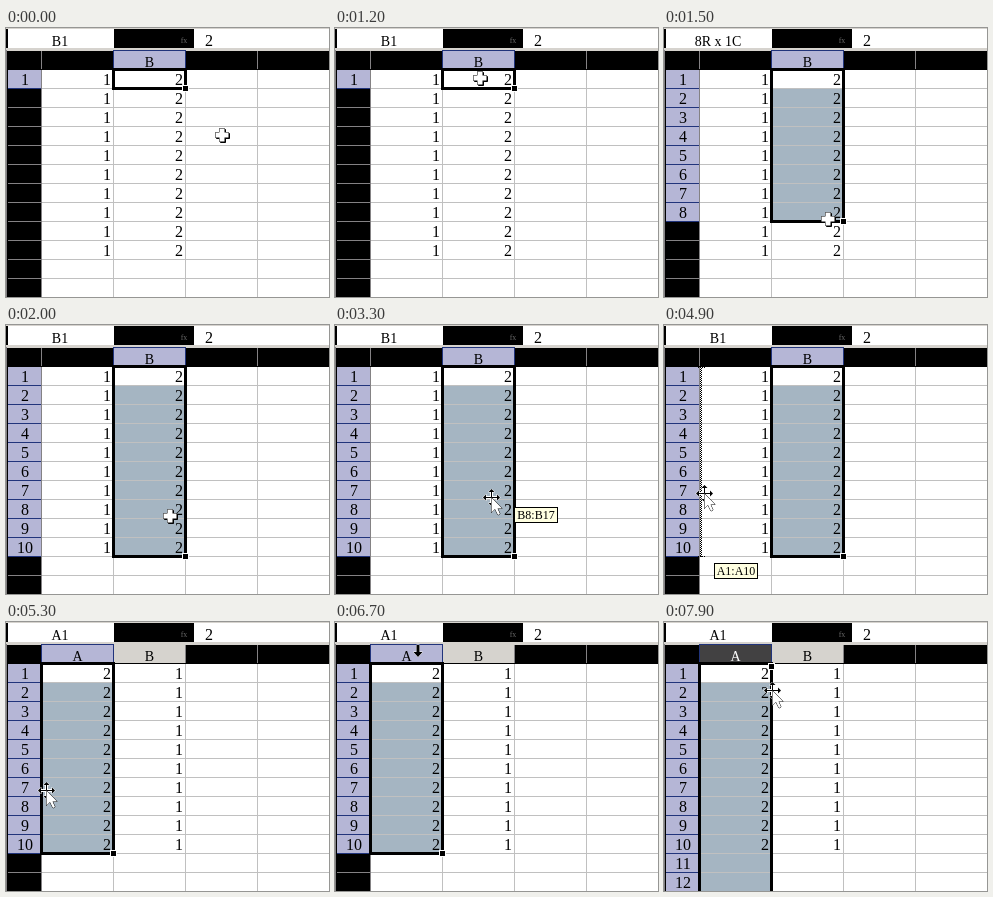
Animation, 323 px wide and 269 px high, one loop 8 s. Source, as an HTML page with a canvas:

```html
<!DOCTYPE html>
<html lang="en">
<head>
<meta charset="utf-8">
<title>Swapping two columns</title>
<style>
  html, body { margin: 0; width: 100%; height: 100%; overflow: hidden; background: #000; }
  canvas { display: block; }
</style>
</head>
<body>
<canvas id="stage" width="323" height="269"></canvas>
<script>
const ctx = document.getElementById('stage').getContext('2d');
const LOOP = 8000, LEFT = 36, TOP = 42, COL = 72, ROW = 19;
const LIT = '#b5b6d6', LIT_EDGE = '#21347b', FULL = '#424142';
const PLAIN = '#d6d3ce', EDGE = '#848284', GRID = '#c0c0c0', SELECTED = '#a5b5c2';

// Each step keeps the values of the one before it unless it changes them.
const steps = [
  { t: 0, name: 'B1', col: 1, rows: 1, swapped: false, cursor: 'plus', x: 216, y: 107 },
  { t: 1000, x: 148, y: 53 },
  { t: 1200, x: 145, y: 50 },
  { t: 1500, name: '8R x 1C', rows: 8, x: 164, y: 191 },
  { t: 2000, name: 'B1', rows: 10 },
  { t: 2100, x: 168, y: 192 },
  { t: 2600, x: 176, y: 173 },
  { t: 3100, cursor: 'move', y: 172 },
  { t: 3300, x: 156, tip: ['B8:B17', 179, 182] },
  { t: 3800, x: 62, y: 168, tip: ['A8:A17', 114, 189], drop: 'row' },
  { t: 4300, x: 44, tip: ['A1:A10', 50, 238], drop: 'column' },
  { t: 4900, x: 40 },
  { t: 5300, name: 'A1', col: 0, swapped: true, tip: null, drop: null },
  { t: 5400, cursor: 'plus', y: 169 },
  { t: 5900, x: 109, y: 96 },
  { t: 6400, cursor: 'down', x: 82, y: 20 },
  { t: 6700, x: 83, y: 23 },
  { t: 6900, rows: Infinity, x: 87, y: 27 },
  { t: 7400, cursor: 'plus', x: 101, y: 54 },
  { t: 7900, cursor: 'move', x: 108, y: 68 }
];
steps.forEach((step, i) => { steps[i] = { ...steps[i - 1], ...step }; });

function box(color, x, y, w, h) {
  ctx.fillStyle = color;
  ctx.fillRect(x, y, w, h);
}

function text(str, x, y, { size = 16, align = 'center', color = '#000' } = {}) {
  ctx.font = `${size}px "Liberation Serif", serif`;
  ctx.textAlign = align;
  ctx.fillStyle = color;
  ctx.fillText(str, x, y);
}

function shape(path, fill, stroke, width = 1) {
  const p = new Path2D(path);
  if (stroke) {
    ctx.strokeStyle = stroke;
    ctx.lineWidth = width;
    ctx.stroke(p);
  }
  if (fill) {
    ctx.fillStyle = fill;
    ctx.fill(p);
  }
}

const colX = c => LEFT + c * COL;
const rowY = r => TOP + r * ROW;

function drawBars(s) {
  box('#000', 0, 0, 323, 269);
  box(PLAIN, 0, 0, 323, 1);
  box('#fff', 2, 1, 106, 19);
  box('#fff', 188, 1, 135, 19);
  box(PLAIN, 0, 20, 323, 3);
  text(s.name, 54, 18, { size: 14 });
  text('2', 199, 18, { align: 'left' });
  text('fx', 178, 15, { size: 8, color: '#666' });
}

function drawHeaders(s) {
  for (let c = 0; c < 4; c++) {
    const x = colX(c);
    box(EDGE, x - 1, 23, 1, 18);
    if (c === 1 && s.swapped) {
      box(PLAIN, x, 23, COL - 1, 18);
      text('B', x + 35.5, 39, { size: 14 });
    }
  }
  const x = colX(s.col), full = s.rows === Infinity;
  box(LIT_EDGE, x - 1, 22, COL + 1, 20);
  box(full ? FULL : LIT, x, 23, COL - 1, 18);
  text('AB'[s.col], x + 35.5, 39, { size: 14, color: full ? '#fff' : '#000' });

  for (let r = 0; r < 12; r++) {
    const y = rowY(r), lit = r < s.rows;
    if (lit) {
      box(LIT, 2, y, 33, ROW - 1);
      text(r + 1, 19, y + 15);
    }
    box(lit ? LIT_EDGE : EDGE, 2, y + ROW - 1, 33, 1);
  }
  box(EDGE, 0, 22, 1, 247);
  box(EDGE, 35, TOP, 1, 227);
}

function drawCells(s) {
  const x = colX(s.col), height = Math.min(s.rows, 13) * ROW;
  box('#fff', LEFT, TOP, 287, 227);
  box(SELECTED, x, TOP, COL - 1, height - 1);
  box('#fff', x, TOP, COL - 1, ROW - 1);
  for (let r = 1; r <= 12; r++) box(GRID, LEFT, rowY(r) - 1, 287, 1);
  for (let c = 1; c < 4; c++) box(GRID, colX(c) - 1, TOP, 1, 227);
  for (let r = 0; r < 10; r++) {
    for (let c = 0; c < 2; c++) {
      text((c === 1) === s.swapped ? 1 : 2, colX(c) + 69, rowY(r) + 15, { align: 'right' });
    }
  }
  ctx.strokeStyle = '#000';
  ctx.lineWidth = 3;
  ctx.strokeRect(x - 0.5, TOP - 0.5, COL, height);

  // A whole column has its fill handle at the top.
  const handleY = s.rows === Infinity ? TOP : TOP + height - 3;
  box('#fff', x + 68, handleY - 1, 7, 7);
  box('#000', x + 69, handleY, 5, 5);
}

function drawDrop(kind) {
  const [line, shifted] = kind === 'row'
    ? ['M36 174.5H108M36.5 171V180M107.5 171V180', 'M37 175.5H108']
    : ['M36.5 42V232M34 42.5H41M34 231.5H41', 'M37.5 43V232'];
  ctx.setLineDash([1, 1]);
  shape(line, null, '#000');
  shape(shifted, null, '#000');
  ctx.setLineDash([]);
}

function drawTip([label, x, y]) {
  box('#000', x, y, 44, 16);
  box('#ffffe1', x + 1, y + 1, 42, 14);
  text(label, x + 22, y + 12, { size: 12 });
}

const cursors = {
  plus() {
    const plus = 'M-2.5-6.5H2.5V-2.5H6.5V2.5H2.5V6.5H-2.5V2.5H-6.5V-2.5H-2.5Z';
    ctx.translate(1, 1);
    shape(plus, '#000', '#000');
    ctx.translate(-1, -1);
    shape(plus, null, '#000');
    shape(plus, '#fff');
  },
  move() {
    const arms = 'M-6 .5H7M.5-6V7';
    const heads = 'M.5-8L3.5-5H-2.5ZM.5 9L3.5 6H-2.5ZM-8 .5L-5-2.5V3.5ZM9 .5L6-2.5V3.5Z';
    shape(arms, null, '#fff', 3);
    shape(heads, '#fff', '#fff');
    shape(arms, null, '#000');
    shape(heads, '#000');
    shape('M.5.5V15.5L4 12L7 18L9 17L6.5 11.5H11Z', '#fff', '#000');
  },
  down() {
    shape('M-1.5 0H1.5V7H4.5L0 12L-4.5 7H-1.5Z', '#000', '#fff');
  }
};

function draw(now) {
  const t = now % LOOP;
  const s = steps.findLast(step => step.t <= t);
  drawBars(s);
  drawHeaders(s);
  drawCells(s);
  if (s.drop) drawDrop(s.drop);
  if (s.tip) drawTip(s.tip);
  ctx.save();
  ctx.translate(s.x, s.y);
  cursors[s.cursor]();
  ctx.restore();
}

const start = performance.now();
function tick() {
  draw(performance.now() - start);
  requestAnimationFrame(tick);
}
tick();
</script>
</body>
</html>
```
